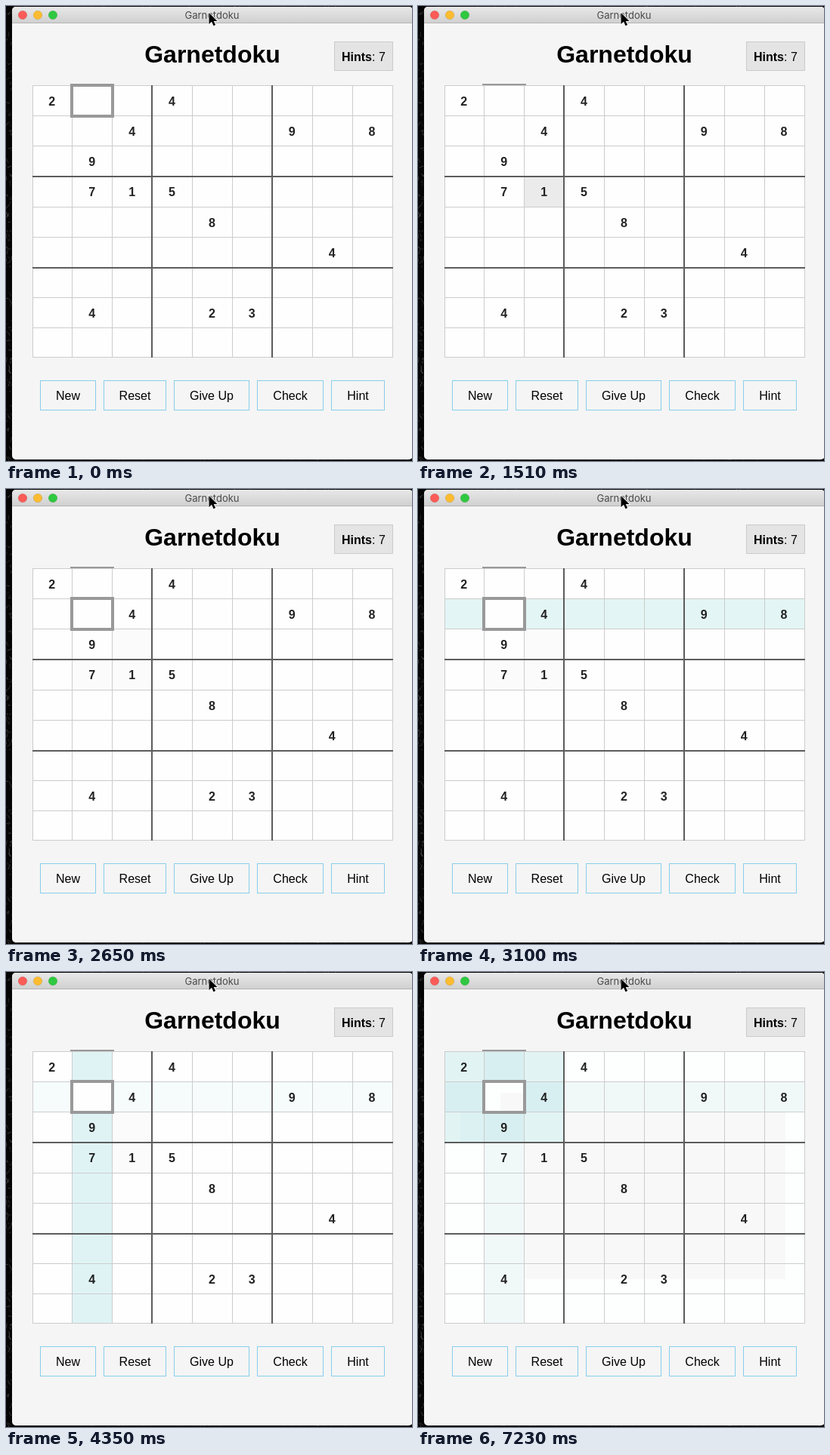
An HTML page with a canvas that plays this animation: 537x603 px, repeating every 8 s.

```html
<!DOCTYPE html>
<html lang="en">
<head>
<meta charset="utf-8">
<title>Garnetdoku</title>
<style>
html, body { margin: 0; width: 100%; height: 100%; overflow: hidden; background: #000; }
canvas { display: block; }
</style>
</head>
<body>
<canvas id="stage" width="537" height="603"></canvas>
<script>
const ctx = document.getElementById('stage').getContext('2d');
const NAME = 'Garnetdoku';
const SANS = '"Liberation Sans", Arial, sans-serif';
const LOOP = 8000;
const xs = [35, 87, 140, 192, 246, 299, 351, 405, 458, 511];
const ys = [105, 145, 185, 225, 266, 306, 346, 386, 426, 465];
const puzzle = ['2  4     ', '  4   9 8', ' 9       ', ' 715     ', '    8    ',
  '       4 ', '         ', ' 4  23   ', '         '];
const buttons = [['New', 45, 74], ['Reset', 129, 83], ['Give Up', 222, 100],
  ['Check', 332, 88], ['Hint', 430, 71]];
// Focus ring: start time, then column and row when an empty cell has focus
const focus = [[0, 1, 0], [980, 1, 1], [1160], [1690, 2, 2], [1770],
  [2130, 1, 1], [2390, 1, 0], [2650, 1, 1]];

function rect(x, y, w, h, color) {
  ctx.fillStyle = color;
  ctx.fillRect(x, y, w, h);
}

function box(x, y, w, h, fill, border) {
  rect(x, y, w, h, border);
  rect(x + 1, y + 1, w - 2, h - 2, fill);
}

function text(str, x, y, font, color = '#000', align = 'center') {
  ctx.font = font;
  ctx.fillStyle = color;
  ctx.textAlign = align;
  ctx.fillText(str, x, y);
}

function cell(c, r, color, alpha = 1) {
  ctx.globalAlpha = alpha;
  rect(xs[c], ys[r], xs[c + 1] - xs[c], ys[r + 1] - ys[r], color);
  ctx.globalAlpha = 1;
}

function row(color) {
  for (let c = 0; c < 9; c++) if (c !== 1) cell(c, 1, color);
}

function column(color) {
  for (let r = 0; r < 9; r++) if (r !== 1) cell(1, r, color);
}

// Full between on and off, then one weaker step
const flash = (t, on, off) => t < on || t >= off + 85 ? 0 : t < off ? 1 : 0.4;

function desktop() {
  rect(0, 0, 537, 603, '#050505');
  let seed = 11;
  const rnd = () => (seed = seed * 16807 % 2147483647) / 2147483647;
  ctx.lineWidth = 0.7;
  for (let i = 0; i < 190; i++) {
    const side = i < 120;
    const x = side ? rnd() * 8 : rnd() * 537;
    const y = side ? rnd() * 603 : i % 2 ? 0 : 602;
    ctx.strokeStyle = `rgba(150,150,150,${0.2 + rnd() * 0.4})`;
    ctx.beginPath();
    ctx.moveTo(x, y);
    ctx.lineTo(x + rnd() * 10 - 5, y + rnd() * 14 - 7);
    ctx.stroke();
  }
}

function pointer(x, y) {
  ctx.save();
  ctx.translate(x, y);
  const shape = new Path2D('M0 0V15L3.5 11.8L6 17.2L8.6 16L6.2 10.9H11Z');
  ctx.strokeStyle = '#fff';
  ctx.lineWidth = 1.6;
  ctx.stroke(shape);
  ctx.fillStyle = '#000';
  ctx.fill(shape);
  ctx.restore();
}

function appWindow() {
  ctx.save();
  ctx.beginPath();
  ctx.roundRect(8, 1, 530, 600, 5);
  ctx.clip();
  rect(8, 1, 530, 600, '#f5f5f5');
  const bar = ctx.createLinearGradient(0, 1, 0, 22);
  bar.addColorStop(0, '#e8e8e8');
  bar.addColorStop(1, '#d0d0d0');
  rect(8, 1, 530, 21, bar);
  rect(8, 22, 530, 1, '#b4b4b4');
  ctx.restore();

  ['#fc5b57', '#fdbc30', '#2fc840'].forEach((color, i) => {
    ctx.beginPath();
    ctx.arc(22 + 20 * i, 12, 5.8, 0, 7);
    ctx.fillStyle = color;
    ctx.fill();
    ctx.lineWidth = 0.5;
    ctx.strokeStyle = 'rgba(0,0,0,.2)';
    ctx.stroke();
  });
  text(NAME, 272.5, 17, '13px Inter, sans-serif', '#4a4a4a');
  pointer(268.5, 9);

  text(NAME, 273, 75, `bold 32px ${SANS}`);
  box(434, 47, 78, 39, '#e4e4e4', '#cbcbcb');
  text('Hints', 444, 73, `bold 16px ${SANS}`, '#000', 'left');
  text(': 7', 484, 73, `16px ${SANS}`, '#000', 'left');

  for (const [label, x, w] of buttons) {
    box(x, 496, w, 40, '#f5f5f5', '#87ceeb');
    text(label, x + w / 2, 522, `16px ${SANS}`);
  }
}

function highlights(t) {
  rect(35, 105, 477, 361, t < 5700 ? '#fefefe' : '#fdfffe');
  if (t < 5700) {
    if (t >= 1770) {
      cell(2, 2, '#fbfbfb');
      cell(1, 3, '#fbfbfb');
      cell(2, 3, '#fbfbfb');
    }
    cell(1, 2, '#ebebeb', flash(t, 1330, 1420) + flash(t, 1950, 2130));
    cell(2, 3, '#ebebeb', flash(t, 1510, 1690));
  } else {
    rect(109, 160, 377, 247, '#f8f8f8');
  }

  if (t >= 7230) {
    row('#f1f9f8');
    column('#f1f9f8');
    for (let r = 0; r < 3; r++)
      for (let c = 0; c < 3; c++)
        if (c !== 1 || r !== 1) cell(c, r, c === 1 || r === 1 ? '#d8eff1' : '#e1f4f3');
    rect(56, 186, 31, 39, '#dbf1f2');
  } else if (t >= 5700) {
    row('#dff3f1');
    column('#d9f0f2');
  } else if (t >= 4350) {
    row('#f6fcfc');
    column('#dff3f5');
  } else if (t >= 4260) {
    row('#eef9f9');
    column('#eff9fa');
  } else if (t >= 3100) {
    row('#e3f5f4');
  }
}

function grid() {
  for (const thick of [false, true]) {
    for (let i = 0; i < 10; i++) {
      if ((i === 3 || i === 6) !== thick) continue;
      const w = thick ? 2 : 1, color = thick ? '#5c5c5c' : '#ccc';
      rect(xs[i], 105, w, 361, color);
      rect(35, ys[i], 477, w, color);
    }
  }
  puzzle.forEach((line, r) => [...line].forEach((digit, c) =>
    text(digit, 60.8 + 52.9 * c, 132 + 40.15 * r, `bold 16px ${SANS}`, '#222')));
}

function ring(t) {
  const [, c, r] = focus.findLast(step => t >= step[0]);
  if (c === undefined) return;
  const w = xs[c + 1] - xs[c] + 5, h = ys[r + 1] - ys[r] + 5;
  ctx.strokeStyle = '#999';
  ctx.lineWidth = 4;
  ctx.strokeRect(xs[c], ys[r], w - 4, h - 4);
}

function draw(now) {
  const t = now % LOOP;
  highlights(t);
  grid();
  ring(t);
  requestAnimationFrame(draw);
}

desktop();
appWindow();
requestAnimationFrame(draw);
</script>
</body>
</html>
```
